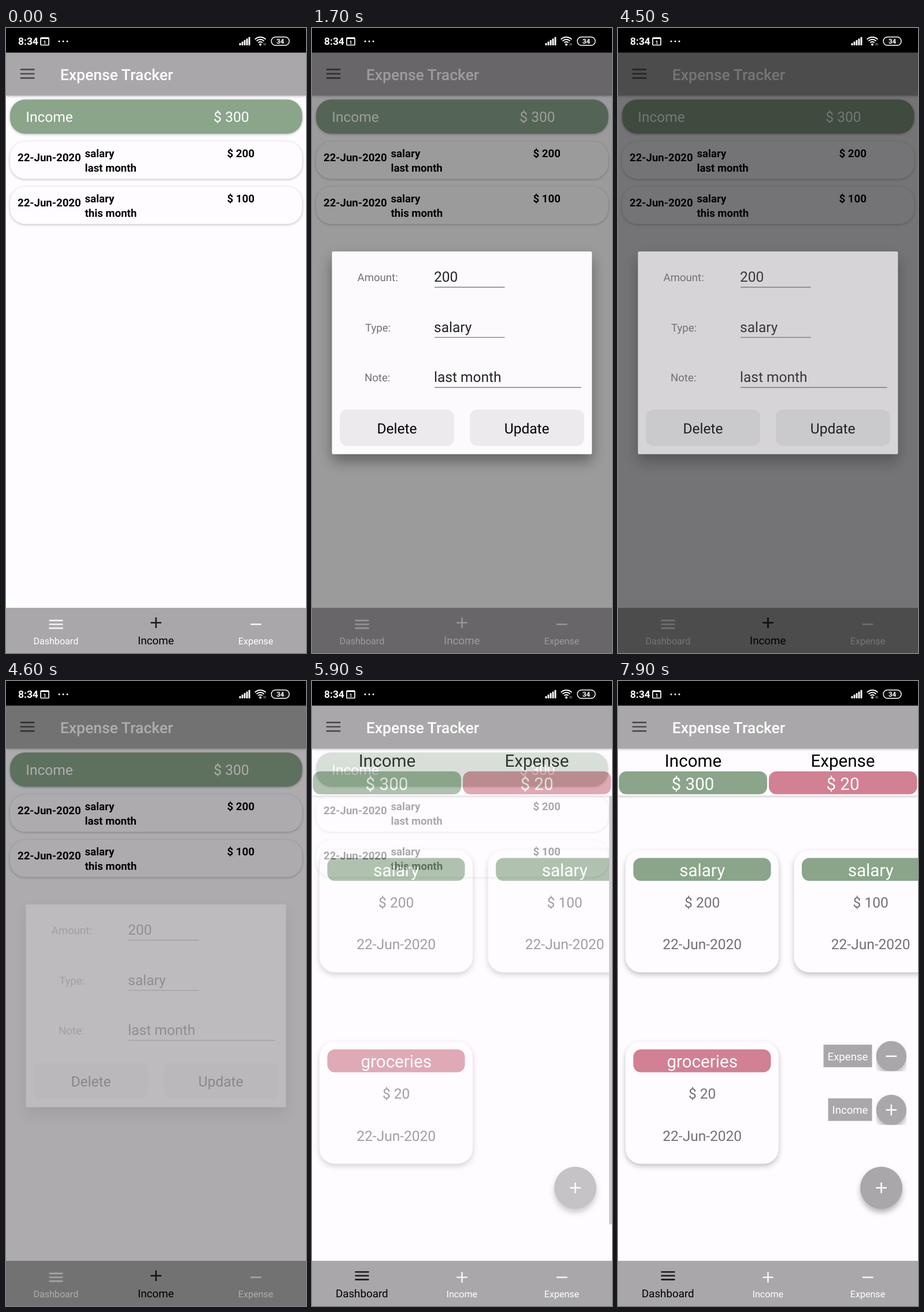
Recreate the animation shown at these times as an HTML page. Size 519x1079 px, loop 8 s.

```html
<!DOCTYPE html>
<html lang="en">
<head>
<meta charset="utf-8">
<title>Expense Tracker</title>
<style>
  html, body { margin: 0; width: 100%; height: 100%; overflow: hidden; background: #fefcff; }
  svg { display: block; width: 100vw; height: 100vh; }
  text { font-family: Roboto, sans-serif; text-rendering: geometricPrecision; white-space: pre; }
  .bar { filter: drop-shadow(0 1px 2px rgba(0,0,0,.3)); }
  .row { filter: drop-shadow(0 1.5px 2px rgba(0,0,0,.27)); }
  .card { filter: drop-shadow(0 4px 5px rgba(0,0,0,.24)); }
  .dialog { filter: drop-shadow(0 12px 12px rgba(0,0,0,.38)); }
  .fab { filter: drop-shadow(0 6px 5px rgba(0,0,0,.28)); }
</style>
</head>
<body>
<svg id="stage" viewBox="0 0 519 1079"></svg>
<script>
const GREY = '#a9a7a9', PAPER = '#fefcff', GREEN = '#8aa58a', PINK = '#d28093', MUTED = '#737173';
const BODY = 24.5, LARGE = 29.6, SMALL = 18.6;

const rect = (x, y, w, h, fill, r = 0, extra = '') =>
  `<rect x="${x}" y="${y}" width="${w}" height="${h}" rx="${r}" fill="${fill}" ${extra}/>`;
const text = (s, x, y, size, fill = '#000', weight = 400, anchor = 'start') =>
  `<text x="${x}" y="${y}" font-size="${size}" fill="${fill}" font-weight="${weight}" text-anchor="${anchor}">${s}</text>`;
const centred = (s, x, y, size, fill) => text(s, x, y, size, fill, 400, 'middle');
const stroke = (d, color, width = 2.6, extra = '') =>
  `<path d="${d}" fill="none" stroke="${color}" stroke-width="${width}" ${extra}/>`;
const group = (id, content) => `<g id="${id}">${content}</g>`;

const menuPath = (x, y, w, gap) =>
  [-gap, 0, gap].map(dy => `M${x - w / 2} ${y + dy}h${w}`).join('');
const minusPath = (x, y) => `M${x - 9.3} ${y}h18.6`;
const plusPath = (x, y) => minusPath(x, y) + `M${x} ${y - 9.3}v18.6`;

function statusBar() {
  const signal = [0, 1, 2, 3, 4].map(i =>
    rect(403.5 + i * 4, 26 - i * 2.6, 2.9, 4 + i * 2.6, '#fff', .8)).join('');
  const wifi = [5, 9, 13].map(r => {
    const d = r * .72;
    return stroke(`M${440 - d} ${29 - d}A${r} ${r} 0 0 1 ${440 + d} ${29 - d}`, '#fff', 2);
  }).join('');
  const dots = [92, 99, 106].map(x => `<circle cx="${x}" cy="23" r="1.5" fill="#fff"/>`).join('');
  return rect(0, 0, 519, 42.5, '#000') + text('8:34', 21, 29, 17.4, '#fff', 700)
    + rect(60, 17, 14, 12.5, 'none', 1, 'stroke="#fff" stroke-width="1.7"')
    + rect(60, 16, 14, 3, '#fff') + text('1', 67, 28, 9, '#fff', 700, 'middle')
    + dots + signal + wifi + '<circle cx="440" cy="28.5" r="2" fill="#fff"/>'
    + stroke('M446.5 26v4M449 26v4', '#aaa', 1)
    + rect(459, 15.5, 31, 14.5, '#111', 7.2, 'stroke="#fff" stroke-width="1.4"')
    + text('34', 474.5, 27, 11.5, '#fff', 700, 'middle');
}

const toolbar = () => rect(0, 42, 519, 74.5, GREY, 0, 'class="bar"')
  + stroke(menuPath(37, 79, 24.5, 7.4), '#000', 2.6, 'opacity=".54"')
  + text('Expense Tracker', 93.7, 90, 26.5, '#fff', 500);

function incomeRow(y, note, amount) {
  return rect(7, y, 505.5, 64.5, PAPER, 26.4, 'class="row"')
    + text('22-Jun-2020', 20, y + 34, SMALL, '#000', 700)
    + text('salary', 136.5, y + 27, SMALL, '#000', 700)
    + text(note, 136.5, y + 52, SMALL, '#000', 700)
    + text(amount, 382.5, y + 27, SMALL, '#000', 700);
}

const incomePage = () => rect(7, 123.5, 505.5, 59, GREEN, 26.4, 'class="row"')
  + text('Income', 34.3, 162.3, BODY, '#fff') + text('$ 300', 359.3, 162.3, BODY, '#fff')
  + incomeRow(196, 'last month', '$ 200') + incomeRow(274, 'this month', '$ 100');

function entryCard(x, y, type, amount, color) {
  const mid = x + 132.7;
  return rect(x, y, 265, 211, PAPER, 26.4, 'class="card"')
    + rect(x + 13.5, y + 13.5, 238, 39.5, color, 13.2)
    + centred(type, mid, y + 44.5, LARGE, '#fff')
    + centred(amount, mid, y + 98.5, BODY, MUTED)
    + centred('22-Jun-2020', mid, y + 171, BODY, MUTED);
}

function miniAction(label, y, labelX, icon) {
  const id = 'clip' + label;
  return `<clipPath id="${id}"><rect x="446.5" y="${y - 26.5}" width="52.5" height="52.5"/></clipPath>`
    + rect(labelX, y - 20, 439.5 - labelX, 39, GREY)
    + centred(label, (labelX + 439.5) / 2, y + 6.8, SMALL, '#fff')
    + `<g clip-path="url(#${id})"><circle class="fab" cx="472.8" cy="${y}" r="26.2" fill="${GREY}"/></g>`
    + stroke(icon(472.8, y), '#fff', 2.5);
}

const dashboardPage = () => rect(0, 116.5, 519, 885, PAPER)
  + rect(0, 117, 519, 81, PAPER, 2, 'class="row"')
  + centred('Income', 130, 148, LARGE) + centred('Expense', 389, 148, LARGE)
  + rect(1.5, 156, 256.5, 39.5, GREEN, 13.2) + rect(261, 156, 256.5, 39.5, PINK, 13.2)
  + centred('$ 300', 129.5, 187.5, LARGE, '#fff') + centred('$ 20', 389, 187.5, LARGE, '#fff')
  + entryCard(13, 292, 'salary', '$ 200', GREEN)
  + entryCard(304.5, 292, 'salary', '$ 100', GREEN)
  + entryCard(13, 622.5, 'groceries', '$ 20', PINK)
  + group('scrollbar', rect(514, 199, 5, 739, '#b4b2b5'))
  + group('actions', miniAction('Expense', 647.8, 355.5, minusPath)
    + miniAction('Income', 740.5, 363.5, plusPath))
  + `<circle id="fab" class="fab" cx="455.5" cy="875" r="36.5"/>`
  + stroke(plusPath(455.5, 875), '#fff', 2.4);

const navItems = [
  { name: 'Dashboard', x: 86.3, icon: menuPath(86.5, 1029.5, 24, 6.6) },
  { name: 'Income', x: 259.3, icon: plusPath(259.5, 1029.5) },
  { name: 'Expense', x: 432, icon: minusPath(432.3, 1029.5) },
];
const navigation = () => rect(0, 1001, 519, 78, GREY)
  + navItems.map(n => group('nav' + n.name,
    stroke(n.icon, '#fff', 2.6) + centred(n.name, n.x, 1063.7, 16.1, '#fff'))).join('');

function field(label, labelX, value, y, lineEnd) {
  return text(label, labelX, y, SMALL, MUTED) + text(value, 211, y + 1, BODY, '#222')
    + stroke(`M212 ${y + 10.5}H${lineEnd}`, '#807e80', 1.3);
}

const dialog = () => rect(34.5, 385.8, 449.8, 350, PAPER, 2.6, 'class="dialog"')
  + field('Amount:', 78.5, '200', 437, 333.5)
  + field('Type:', 92, 'salary', 523.7, 333.5)
  + field('Note:', 91, 'last month', 610, 465.5)
  + rect(48, 658.8, 198, 62.8, '#eeecee', 13) + rect(273, 658.8, 198, 62.8, '#eeecee', 13)
  + centred('Delete', 147, 699.5, BODY) + centred('Update', 371.7, 699.5, BODY);

const stage = document.getElementById('stage');
stage.innerHTML = rect(0, 0, 519, 1079, PAPER)
  + group('income', incomePage()) + group('dashboard', dashboardPage())
  + toolbar() + navigation()
  + group('dim', rect(0, 42, 519, 1037, '#000')) + group('dialog', dialog()) + statusBar();

const el = id => document.getElementById(id);
const fade = (id, value) => {
  el(id).setAttribute('opacity', value);
  el(id).style.display = value > 0 ? '' : 'none';
};
const progress = (t, from, to) => Math.min(1, Math.max(0, (t - from) / (to - from)));
const ease = p => (1 - Math.cos(Math.PI * p)) / 2;

// Linear interpolation through [time, value] pairs.
function track(t, keys) {
  let value = keys[0][1];
  for (let i = 1; i < keys.length; i++) {
    const [t0, v0] = keys[i - 1], [t1, v1] = keys[i];
    if (t >= t0) value = v0 + (v1 - v0) * progress(t, t0, t1);
  }
  return value;
}

function setNav(name, active, dark) {
  const [icon, label] = el('nav' + name).children;
  icon.setAttribute('transform', `translate(0 ${-2.7 * active})`);
  icon.setAttribute('stroke', dark ? '#1c1b1c' : '#f4f3f4');
  label.setAttribute('font-size', 16.1 + 2.7 * active);
  label.setAttribute('fill', dark ? '#000' : '#fff');
}

function draw(time) {
  const t = Math.floor(time % 8000 / 100) * 100;
  fade('dim', track(t, [[1600, 0], [1700, .39], [1800, .605], [4400, .605], [4500, .54], [4600, .32], [4700, .12], [4800, 0]]));
  fade('dialog', track(t, [[1600, 0], [1700, .98], [1800, 1], [4400, 1], [4500, .71], [4600, .2], [4700, 0]]));

  const page = progress(t, 5700, 6000);
  fade('dashboard', page);
  fade('income', page < 1 ? 1 : 0);

  const moved = progress(t, 5700, 5850);
  const dialogFocused = t >= 1700 && t < 4500;
  setNav('Dashboard', moved, t >= 5700);
  setNav('Income', 1 - moved, !dialogFocused && t <= 5700);
  setNav('Expense', 0, false);

  fade('scrollbar', 1 - progress(t, 6950, 7200));
  fade('actions', ease(progress(t, 6750, 7550)));
  const press = t < 6800 ? 0 : 1 - progress(t, 6900, 7300);
  const shade = 169 - 22 * press;
  el('fab').setAttribute('fill', `rgb(${shade},${shade - 2},${shade})`);
}

const start = performance.now();
function tick() {
  draw(performance.now() - start);
  requestAnimationFrame(tick);
}
tick();
</script>
</body>
</html>
```
